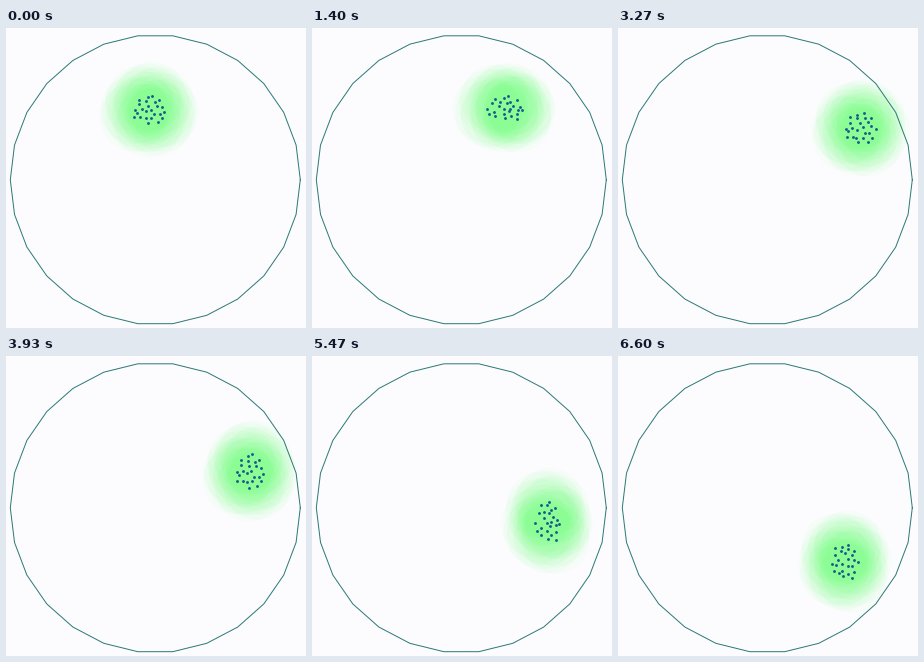
A matplotlib script for the animation above (6.67 s loop, 300 by 300 pixels).

```python
import numpy as np
import matplotlib.pyplot as plt
from matplotlib.animation import FuncAnimation

SIZE, DPI = 300, 100
FRAMES, LOOP = 100, 6670
COUNT = 25
PAPER = np.array([252, 252, 254]) / 255
GREEN = np.array([0, 255, 18]) / 255
INK = "#16598c"
RIM = "#2f7a78"
REACH, VEIL = 34, 0.0235  # glow radius and opacity per member

# waypoints of the flock: time in ms and centre
TIMES = np.array([0, 1400, 2400, 3270, 4600, 5470, 6600])
STOPS = np.array([(143, 81.5), (192, 79.5), (232, 82), (243, 99.8),
                  (240.7, 136.3), (235, 164.6), (226.4, 208)])
SLOPES = np.gradient(STOPS, TIMES, axis=0)

# members sit on a loosened sunflower spiral and drift a little
rng = np.random.default_rng(4)
order = np.arange(COUNT)
spiral = order * np.pi * (3 - np.sqrt(5))
radius = np.sqrt((order + 0.5) / COUNT)
SEATS = np.column_stack([radius * np.cos(spiral), radius * np.sin(spiral)])
SEATS += rng.uniform(-0.06, 0.06, SEATS.shape)
PHASES = rng.uniform(0, 2 * np.pi, SEATS.shape)


def centre(t):
    """Cubic Hermite curve through the waypoints."""
    i = min(np.searchsorted(TIMES, t, side="right"), len(TIMES) - 1) - 1
    h = TIMES[i + 1] - TIMES[i]
    u = (t - TIMES[i]) / h
    return ((1 + 2 * u) * (1 - u) ** 2 * STOPS[i]
            + u * (1 - u) ** 2 * h * SLOPES[i]
            + u * u * (3 - 2 * u) * STOPS[i + 1]
            + u * u * (u - 1) * h * SLOPES[i + 1])


def half_size(t):
    """The flock is wide while heading right and tall while heading down."""
    swing = np.cos(2 * np.pi * (t - 1500) / 7500)
    return np.array([14.5 + 3 * swing, 15 - 4 * swing])


def flock(t):
    seats = SEATS + 0.07 * np.sin(2 * np.pi * t / 4000 + PHASES)
    low, high = seats.min(axis=0), seats.max(axis=0)
    unit = (2 * seats - low - high) / (high - low)
    return centre(t) + unit * half_size(t)


PIX = np.arange(SIZE) + 0.5


def glow(points):
    """Stack one translucent disc per member over the paper."""
    cover = np.zeros((SIZE, SIZE))
    for x, y in points:
        dist = np.hypot(PIX[None, :] - x, PIX[:, None] - y)
        cover += np.clip(REACH + 0.5 - dist, 0, 1)
    keep = ((1 - VEIL) ** cover)[..., None]
    return keep * PAPER + (1 - keep) * GREEN


fig = plt.figure(figsize=(SIZE / DPI, SIZE / DPI), dpi=DPI, facecolor=PAPER)
ax = fig.add_axes([0, 0, 1, 1])
ax.axis("off")

start = flock(0)
halo = ax.imshow(glow(start), extent=(0, SIZE, SIZE, 0), interpolation="nearest")
ax.set(xlim=(0, SIZE), ylim=(SIZE, 0))

angle = np.linspace(0, 2 * np.pi, 27)
ax.plot(149.3 + 145 * np.cos(angle), 151.75 + 145 * np.sin(angle),
        color=RIM, lw=0.72, snap=False, zorder=2)
dots = ax.scatter(*start.T, s=4.2, color=INK, linewidths=0, zorder=3)


def draw(i):
    points = flock(i * LOOP / FRAMES)
    halo.set_data(glow(points))
    dots.set_offsets(points)
    return halo, dots


anim = FuncAnimation(fig, draw, frames=FRAMES, interval=LOOP / FRAMES,
                     repeat=True, repeat_delay=0)
plt.show()
```
